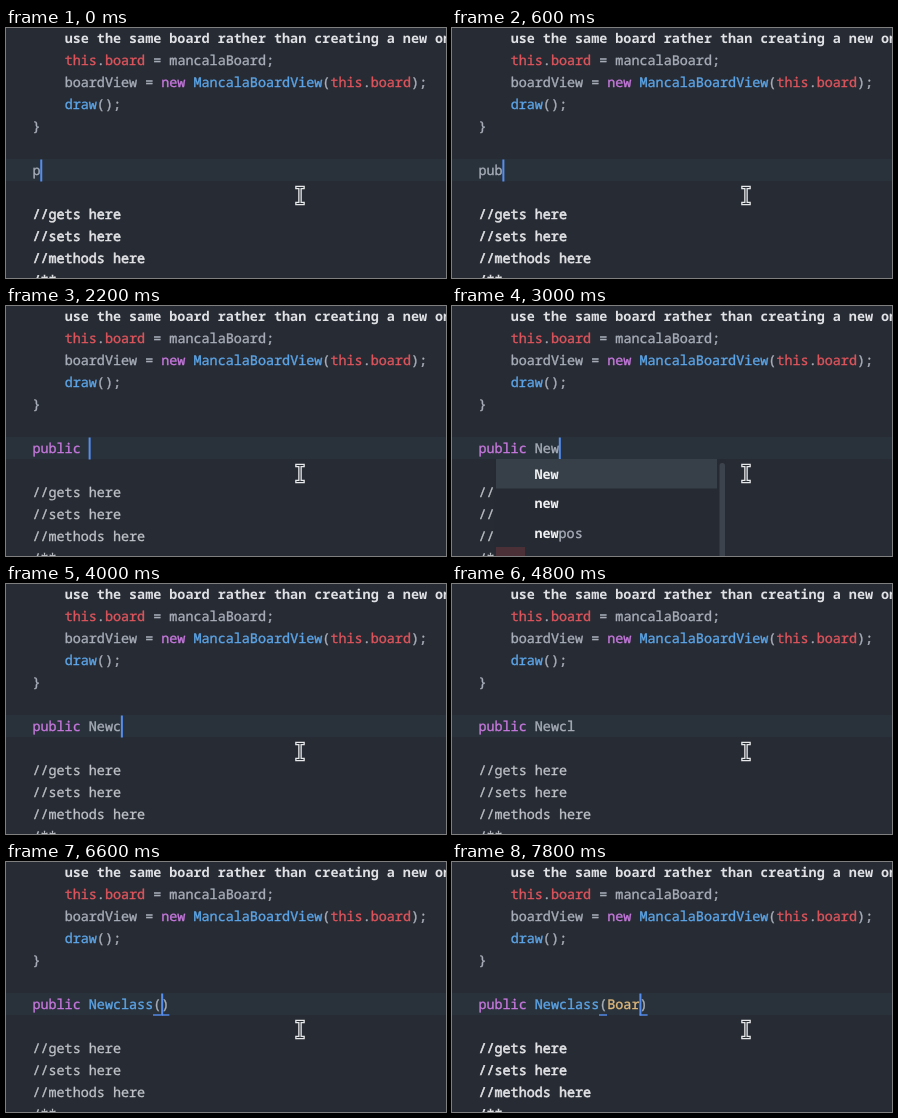
Animation, 440 px wide and 250 px high, one loop 8 s. Source, as an HTML page:

```html
<!DOCTYPE html>
<html lang="en">
<head>
<meta charset="utf-8">
<title>Typing a constructor</title>
<style>
  html, body { margin: 0; width: 100%; height: 100%; overflow: hidden; background: #272b33; }
  svg { display: block; width: 100vw; height: 100vh; }
  text {
    font: 13.43px "Noto Sans Mono", "DejaVu Sans Mono", monospace;
    white-space: pre;
    text-rendering: geometricPrecision;
    color: #a8aeb9;
  }
  text, tspan { fill: currentColor; stroke: currentColor; stroke-width: 0.35px; }
  .key { color: #c678dd; }
  .call { color: #5ca5e8; }
  .self { color: #de545c; }
  .type { color: #dfb87c; }
  .note { color: #e2e3e6; stroke-width: 0.6px; }
  .dim .note { color: #bfc2c8; stroke-width: 0.3px; }
  .bold { color: #f0f1f3; font-weight: 700; stroke: none; }
  .head { color: #dfe1e5; font-weight: 600; stroke: none; }
  .accent { fill: #568ef0; }
  .panel { fill: #262a32; }
  .selected { fill: #374049; }
</style>
</head>
<body>
<svg viewBox="0 0 440 250" preserveAspectRatio="none">
  <rect width="440" height="250" fill="#272b33"/>
  <rect y="131" width="440" height="22" fill="#29323a"/>
  <g id="code"></g>
  <text id="typed" x="26.4" y="147"></text>
  <g id="brackets" class="accent">
    <rect x="147" y="152.3" width="8" height="1.4"/>
    <rect id="closing" y="152.3" width="8" height="1.4"/>
  </g>
  <rect id="caret" class="accent" y="131.5" width="2" height="22"/>

  <g id="publicList">
    <rect class="selected" x="19" y="153" width="210" height="30"/>
    <text class="bold" x="26.4" y="172.5">public</text>
  </g>
  <g id="newList">
    <rect class="panel" x="42" y="153" width="232" height="97"/>
    <rect class="selected" x="44" y="153" width="221" height="29.5"/>
    <rect x="267.5" y="157" width="5.5" height="100" rx="2.5" fill="#3d434d"/>
    <rect x="44" y="241" width="29" height="9" fill="#4b3037"/>
    <text class="bold" x="82.4" y="172.5">New</text>
    <text class="bold" x="82.4" y="202">new</text>
    <text x="82.4" y="231.5"><tspan class="bold">new</tspan>pos</text>
  </g>

  <g fill="none" stroke-linecap="square">
    <path id="beam" d="M291 159.5H297M294 160V175M291 175.5H297" stroke="#e6e8ea" stroke-width="3.6"/>
    <path d="M291 159.5H297M294 160V175M291 175.5H297" stroke="#2a2e35" stroke-width="1"/>
  </g>
</svg>
<script>
const LOOP = 8000, STEP = 200, LEFT = 26.4, CHAR = 8.06;
const $ = id => document.getElementById(id);
const span = (kind, text) => `<tspan class="${kind}">${text}</tspan>`;

// Row number, indent in characters, content
const lines = [
  [0, 4, span('head', 'use the same board rather than creating a new one')],
  [1, 4, span('self', 'this') + '.' + span('self', 'board') + ' = mancalaBoard;'],
  [2, 4, 'boardView = ' + span('key', 'new') + ' ' + span('call', 'MancalaBoardView') +
    '(' + span('self', 'this') + '.' + span('self', 'board') + ');'],
  [3, 4, span('call', 'draw') + '();'],
  [4, 0, '}'],
  [8, 0, span('note', '//gets here')],
  [9, 0, span('note', '//sets here')],
  [10, 0, span('note', '//methods here')],
  [11, 0, span('note', '/**')]
];
$('code').innerHTML = lines.map(([row, indent, body]) =>
  `<text x="${LEFT + indent * CHAR}" y="${15 + row * 22}">${body}</text>`).join('');

const phrase = 'public Newclass(Boar';
// Time of each keystroke after the first letter
const keys = [400, 600, 800, 1000, 1200, 2000, 2400, 2600, 2800,
  3800, 4200, 5200, 5400, 5800, 6600, 7000, 7200, 7400, 7600];
const between = (t, from, to) => t >= from && t < to;
const show = (id, on) => $(id).style.display = on ? '' : 'none';

function markup(text) {
  const open = text.includes('(');
  const [head, args = ''] = text.split('(');
  const word = head.slice(0, 6), name = head.slice(6);
  return span(word === 'public' ? 'key' : '', word) + span(open ? 'call' : '', name) +
    (open ? '(' + span('type', args) + ')' : '');
}

let last = -1;
function draw() {
  const t = Math.floor(performance.now() % LOOP / STEP) * STEP;
  if (t !== last) {
    last = t;
    const count = 1 + keys.filter(k => k <= t).length;
    const end = LEFT + count * CHAR;
    $('typed').innerHTML = markup(phrase.slice(0, count));
    $('caret').setAttribute('x', end - 0.2);
    $('closing').setAttribute('x', end);
    $('code').classList.toggle('dim', between(t, 800, 7000));
    show('caret', !between(t, 4800, 5200));
    show('brackets', t >= 6600);
    show('publicList', between(t, 800, 2000));
    show('newList', between(t, 2800, 3800));
  }
  requestAnimationFrame(draw);
}
draw();
</script>
</body>
</html>
```
